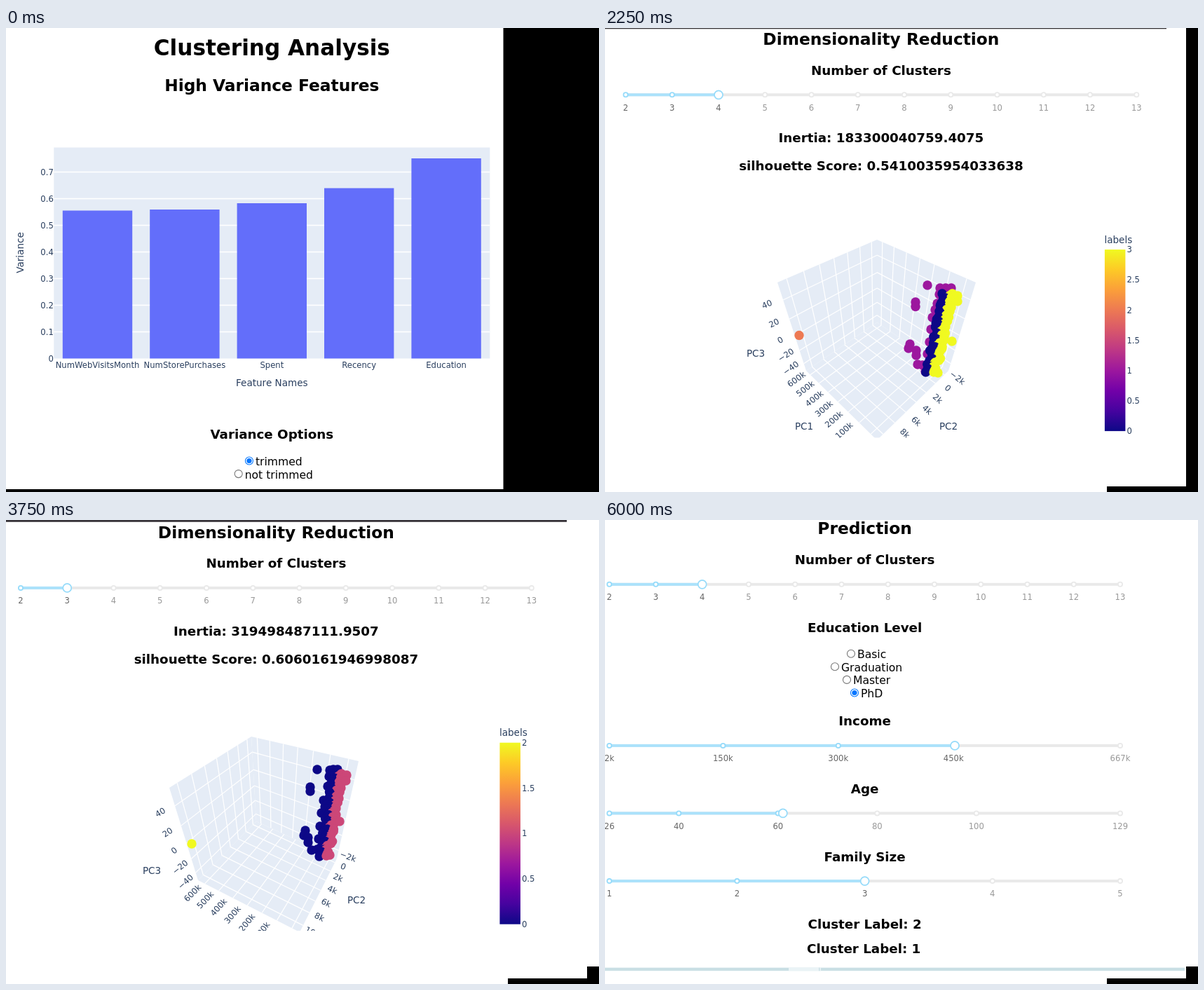
An HTML page with a canvas for the animation above (6.75 s loop, 846 by 662 pixels).

```html
<!DOCTYPE html>
<html lang="en">
<head>
<meta charset="utf-8">
<title>Clustering dashboard</title>
<style>
html, body { margin: 0; width: 100%; height: 100%; overflow: hidden; background: #fff; }
canvas { display: block; }
</style>
</head>
<body>
<canvas id="stage" width="846" height="662"></canvas>
<script>
const ctx = document.getElementById('stage').getContext('2d');
const FONT = '"DejaVu Sans", Verdana, sans-serif';
const INK = '#2a3f5f', PANEL = '#e5ecf6';
const H1 = 31.1, H2 = 23.3, H3 = 18.3, BODY = 15.6, AXIS = 13.55, TICK = 11.6;
const PLASMA = ['#0d0887', '#46039f', '#7201a8', '#9c179e', '#bd3786',
  '#d8576b', '#ed7953', '#fb9f3a', '#fdca26', '#f0f921'];
const NAVY = PLASMA[0], PURPLE = PLASMA[3], PINK = '#cc4778', ORANGE = PLASMA[6], YELLOW = PLASMA[9];

const lerp = (a, b, t) => a + (b - a) * t;

function rect(x, y, w, h, color) {
  ctx.fillStyle = color;
  ctx.fillRect(x, y, w, h);
}

function text(str, x, y, size, { color = '#000', align = 'center', bold = false, turn = 0 } = {}) {
  ctx.save();
  ctx.translate(x, y);
  ctx.rotate(turn * Math.PI / 180);
  ctx.font = `${bold ? 'bold ' : ''}${size}px ${FONT}`;
  ctx.textAlign = align;
  ctx.fillStyle = color;
  ctx.fillText(str, 0, turn ? size * 0.36 : 0);
  ctx.restore();
}

const heading = (str, x, y, size = H3) => text(str, x, y, size, { bold: true });

function disc(x, y, r, fill, stroke, width) {
  ctx.beginPath();
  ctx.arc(x, y, r, 0, Math.PI * 2);
  ctx.fillStyle = fill;
  ctx.fill();
  if (stroke) {
    ctx.strokeStyle = stroke;
    ctx.lineWidth = width;
    ctx.stroke();
  }
}

function line(a, b, color, width) {
  ctx.beginPath();
  ctx.moveTo(...a);
  ctx.lineTo(...b);
  ctx.strokeStyle = color;
  ctx.lineWidth = width;
  ctx.stroke();
}

// ---- form controls ----

function radios(labels, picked, cx, y) {
  labels.forEach((label, i) => {
    const cy = y + i * 18.6;
    ctx.font = `${BODY}px ${FONT}`;
    const left = cx - (ctx.measureText(label).width + 20) / 2;
    const on = i === picked;
    disc(left + 11, cy, 5.5, '#fff', on ? '#0075ff' : '#767676', 1.1);
    if (on) disc(left + 11, cy, 3.6, '#0075ff');
    text(label, left + 20, cy + 6.4, BODY, { align: 'left' });
  });
}

function slider(marks, value, x, y, unit = '') {
  const span = 728.8, first = marks[0], last = marks[marks.length - 1];
  const at = v => x + (v - first) / (last - first) * span;
  rect(x, y - 2, span, 4, '#e9e9e9');
  rect(x, y - 2, at(value) - x, 4, '#abe2fb');
  for (const m of marks) {
    const on = m <= value;
    disc(at(m), y, 3.1, '#fff', on ? '#96dbfa' : '#e9e9e9', 1.8);
    text(m + unit, at(m), y + 22.2, TICK, { color: on ? '#666' : '#999' });
  }
  disc(at(value), y, 6, '#fff', '#96dbfa', 1.7);
}

const COUNTS = Array.from({ length: 12 }, (_, i) => i + 2);

// ---- bar chart page ----

function barPage({ x, y, names, tops, step, gap, ticks, picked }) {
  const cx = x + 311, w = 622, base = y + 301;
  heading('Clustering Analysis', cx, y - 131.7, H1);
  heading('High Variance Features', cx, y - 81, H2);
  rect(x, y, w, 301, PANEL);
  for (let i = 0; i <= ticks; i++) {
    const gy = base - i * gap;
    if (i) rect(x, gy - 0.8, w, 1.6, '#fff');
    text(String(+(i * step).toFixed(1)), x - 0.5, gy + 4.2, TICK, { color: INK, align: 'right' });
  }
  names.forEach((name, i) => {
    const mid = x + w * (i + 0.5) / 5, h = tops[i];
    rect(mid - 49.7, base - h, 99.4, h, '#636efa');
    text(name, mid, base + 13, TICK, { color: INK });
  });
  text('Feature Names', cx, base + 39.2, AXIS, { color: INK });
  text('Variance', x - 48, y + 150, AXIS, { color: INK, turn: -90 });
  heading('Variance Options', cx, base + 114.5);
  radios(['trimmed', 'not trimmed'], picked, cx, base + 146);
}

function trimmedPage() {
  rect(0, 0, 846, 662, '#000');
  rect(0, 0, 709.5, 658, '#fff');
  barPage({
    x: 68.3, y: 170.5, step: 0.1, gap: 38, ticks: 7, picked: 0,
    names: ['NumWebVisitsMonth', 'NumStorePurchases', 'Spent', 'Recency', 'Education'],
    tops: [211, 212.5, 221.5, 243, 285.5]
  });
}

function fullPage() {
  rect(0, 0, 846, 662, '#000');
  rect(0, 0, 716, 662, '#fff');
  barPage({
    x: 73, y: 176, step: 0.2, gap: 57.1, ticks: 5, picked: 1,
    names: ['Income', 'Spent', 'age', 'NumStorePurchases', 'NumWebVisitsMonth'],
    tops: Array(5).fill(285.5)
  });
}

// ---- 3D scatter page ----

// Projective map from the unit square to a quad.
function projector([ax, ay], [bx, by], [cx, cy], [dx, dy]) {
  const x1 = bx - cx, y1 = by - cy, x2 = dx - cx, y2 = dy - cy;
  const sx = ax - bx + cx - dx, sy = ay - by + cy - dy, det = x1 * y2 - x2 * y1;
  const g = (sx * y2 - x2 * sy) / det, h = (x1 * sy - sx * y1) / det;
  return (u, v) => {
    const w = g * u + h * v + 1;
    return [((bx - ax + g * bx) * u + (dx - ax + h * dx) * v + ax) / w,
            ((by - ay + g * by) * u + (dy - ay + h * dy) * v + ay) / w];
  };
}

const spread = (n, from, step) => Array.from({ length: n }, (_, i) => from + i * step);
const FLAT = spread(7, 0.07, 0.143), TALL = spread(5, 0.15, 0.185);

function panel(corners, us, vs) {
  const at = projector(...corners);
  ctx.beginPath();
  corners.forEach(p => ctx.lineTo(...p));
  ctx.fillStyle = PANEL;
  ctx.fill();
  us.forEach(u => line(at(u, 0), at(u, 1), '#fff', 1.2));
  vs.forEach(v => line(at(0, v), at(1, v), '#fff', 1.2));
}

function axisLabels(labels, { from, to, bend, turn }) {
  labels.forEach((label, i) => {
    const s = i / (labels.length - 1), t = s + bend * s * (s - 1);
    text(label, lerp(from[0], to[0], t), lerp(from[1], to[1], t), TICK,
      { color: INK, turn: lerp(turn[0], turn[1], s) });
  });
}

const STRAIGHT = {
  back: [388, 302], left: [246, 363], right: [529, 363],
  lowBack: [388, 420], lowLeft: [287, 489], lowRight: [490, 489], front: [388, 588],
  bottom: 584.5,
  z: { from: [231, 394], to: [265, 485], bend: -0.24, turn: [-22, -36] },
  x: { from: [273, 501], to: [341, 574], bend: 0.1, turn: [-36, -42] },
  y: { from: [503, 499], to: [411, 596], bend: 0.12, turn: [38, 46] },
  titles: [['PC3', 215, 469], ['PC1', 284, 573], ['PC2', 490, 573]],
  lone: [277, 438.5],
  sparse: [[460, 367], [443, 391], [443, 397.5], [435, 451], [433, 457], [444, 460], [444, 467],
    [446, 480], [478, 371], [486, 371], [494, 371], [477, 380], [474, 393], [471, 402],
    [467, 413], [465, 430], [463, 448], [460, 465], [453, 481], [457, 490]],
  mid: [484, 460], dense: [496, 470], rows: [379, 491],
  extra: [[503, 382], [503, 390], [495, 447], [475, 492]]
};

const TURNED = {
  back: [350, 309], left: [233, 382], right: [503, 344],
  lowBack: [357, 430], lowLeft: [274, 514], lowRight: [472, 483], front: [419, 588],
  bottom: 586,
  z: { from: [220, 417], to: [256, 516], bend: -0.2, turn: [-30, -42] },
  x: { from: [266, 532], to: [365, 586], bend: 0.1, turn: [-45, -52] },
  y: { from: [488, 480], to: [437, 588], bend: 0.25, turn: [20, 28] },
  titles: [['PC3', 208, 505], ['PC2', 500, 547]],
  lone: [265, 462],
  sparse: [[444, 356], [434, 381], [434, 387], [427, 443], [425, 450], [431, 453], [431, 460],
    [436, 471], [462, 357], [467, 356], [473, 356], [461, 366], [459, 380], [453, 400],
    [455, 409], [450, 418], [448, 437], [446, 455], [444, 470], [447, 480]],
  mid: [467, 450], dense: [479, 458], rows: [362, 479],
  extra: [[486, 364], [485, 372], [476, 430], [462, 478]]
};

function scatter(v, colors) {
  ctx.save();
  ctx.beginPath();
  ctx.rect(0, 200, 700, v.bottom - 200);
  ctx.clip();
  panel([v.back, v.left, v.lowLeft, v.lowBack], FLAT, TALL);
  panel([v.back, v.right, v.lowRight, v.lowBack], FLAT, TALL);
  panel([v.lowBack, v.lowLeft, v.front, v.lowRight], FLAT, FLAT);
  axisLabels(['40', '20', '0', '−20', '−40'], v.z);
  axisLabels(['600k', '500k', '400k', '300k', '200k', '100k'], v.x);
  axisLabels(['−2k', '0', '2k', '4k', '6k', '8k', '10k'], v.y);
  v.titles.forEach(([t, x, y]) => text(t, x, y, AXIS, { color: INK }));

  const r = 6.7, n = 40;
  let seed = 11;
  const jitter = d => {
    seed = (seed * 16807) % 2147483647;
    return (seed / 2147483647 * 2 - 1) * d;
  };
  const dot = ([x, y], c) => disc(x, y, r, c);
  dot(v.lone, colors.lone);
  v.sparse.forEach(p => dot(p, colors.sparse));
  for (let i = 0; i <= n; i++) {
    const t = i / n, y = lerp(...v.rows, t);
    dot([lerp(...v.mid, t) + jitter(3), y], colors.mid);
    dot([lerp(...v.dense, t) + jitter(4), y], colors.dense);
  }
  v.extra.forEach(p => dot(p, colors.dense));
  ctx.restore();
}

function colorBar(x, y, max) {
  const h = 259, fill = ctx.createLinearGradient(0, y + h, 0, y);
  PLASMA.forEach((c, i) => fill.addColorStop(i / 9, c));
  rect(x, y, 29.5, h, fill);
  text('labels', x - 0.5, y - 9.5, AXIS, { color: INK, align: 'left' });
  const step = max > 1 ? 0.5 : 0.2;
  for (let i = 0; i <= Math.round(max / step); i++) {
    const value = +(i * step).toFixed(1);
    text(String(value), x + 31.5, y + h * (1 - value / max) + 4.2, TICK, { color: INK, align: 'left' });
  }
}

function reductionPage({ k, x, y, inertia, score, view, viewShift = [0, 0], colors }) {
  const cx = x + 364.4;
  heading('Dimensionality Reduction', cx, y - 71, H2);
  heading('Number of Clusters', cx, y - 28.6);
  slider(COUNTS, k, x, y);
  heading('Inertia: ' + inertia, cx, y + 67.6);
  heading('silhouette Score: ' + score, cx, y + 108);
  ctx.save();
  ctx.translate(...viewShift);
  scatter(view, colors);
  ctx.restore();
  colorBar(x + 683.4, y + 220.8, k - 1);
}

const THREE = { inertia: '319498487111.9507', score: '0.6060161946998087', k: 3,
  colors: { lone: YELLOW, sparse: NAVY, mid: NAVY, dense: PINK } };

function whiteWide() {
  rect(0, 0, 846, 662, '#000');
  rect(0, 0, 829, 654, '#fff');
  rect(0, 654, 716, 8, '#fff');
}

function whiteFull() {
  whiteWide();
  rect(829, 0, 17, 637, '#fff');
}

function twoClusters() {
  whiteWide();
  reductionPage({
    k: 2, x: 9.7, y: 95.3, inertia: '582417306925.1836', score: '0.7281640359271845',
    view: STRAIGHT, viewShift: [-20, 0],
    colors: { lone: YELLOW, sparse: YELLOW, mid: NAVY, dense: NAVY }
  });
}

function fourClusters() {
  whiteWide();
  reductionPage({
    k: 4, x: 29.5, y: 95.3, inertia: '183300040759.4075', score: '0.5410035954033638',
    view: STRAIGHT, colors: { lone: ORANGE, sparse: PURPLE, mid: NAVY, dense: YELLOW }
  });
  rect(0, 0, 801, 1.3, '#38363a');
}

function threeClusters() {
  whiteFull();
  reductionPage({ ...THREE, x: 21, y: 96.9, view: STRAIGHT, viewShift: [-8.5, 1.5] });
}

function threeTurned() {
  whiteFull();
  reductionPage({ ...THREE, x: 21, y: 96.9, view: TURNED });
  rect(0, 0, 800, 2.8, '#38343a');
}

// ---- prediction page ----

function predictionPage({ dx = 0, dy = 0, k, level, income, age, family, label }) {
  const x = 16.2, cx = 380.6;
  ctx.save();
  ctx.translate(dx, dy);
  heading('Prediction', cx, 32, H2);
  heading('Number of Clusters', cx, 74.7);
  slider(COUNTS, k, x, 103.4);
  heading('Education Level', cx, 171.5);
  radios(['Basic', 'Graduation', 'Master', 'PhD'], level, cx, 202.3);
  heading('Income', cx, 304.5);
  slider([2, 150, 300, 450, 667], income, x, 333.5, 'k');
  heading('Age', cx, 401.4);
  slider([26, 40, 60, 80, 100, 129], age, x, 430);
  heading('Family Size', cx, 498.4);
  slider([1, 2, 3, 4, 5], family, x, 526.7);
  heading('Cluster Label: ' + label, cx, 594.6);
  ctx.restore();
}

function footer() {
  rect(0, 638.7, 827, 4.5, '#c9dfe4');
  rect(262, 638.7, 46, 4.5, '#eaf3f6');
  rect(305, 638.7, 1.5, 4.5, '#c9dfe4');
}

function firstGuess() {
  whiteFull();
  predictionPage({ k: 5, level: 2, income: 142.5, age: 26, family: 2, label: 1 });
}

function secondGuess() {
  whiteFull();
  predictionPage({ dx: -11.3, dy: 23, k: 4, level: 2, income: 300, age: 40, family: 2, label: 1 });
  footer();
}

function thirdGuess() {
  whiteFull();
  predictionPage({ dx: -10, dy: -11.6, k: 4, level: 3, income: 451.7, age: 61, family: 3, label: 2 });
  heading('Cluster Label: 1', 369.2, 617.6);
  footer();
}

// ---- playback ----

const SCENES = [trimmedPage, fullPage, twoClusters, fourClusters, threeClusters,
  threeTurned, firstGuess, secondGuess, thirdGuess];
const HOLD = 750;
let shown = -1;

function tick() {
  const index = Math.floor(performance.now() / HOLD) % SCENES.length;
  if (index !== shown) {
    SCENES[index]();
    shown = index;
  }
  requestAnimationFrame(tick);
}
tick();
</script>
</body>
</html>
```
